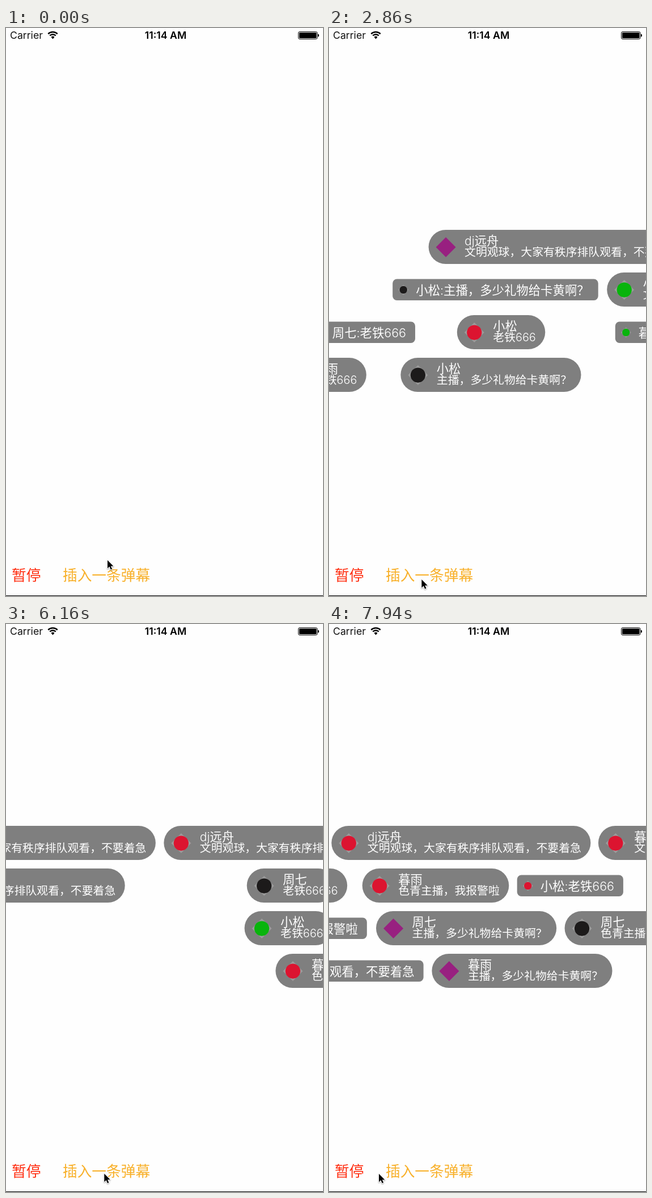
An HTML page with a canvas for the animation above (8000 ms loop, 559 px wide and 999 px high).

```html
<!DOCTYPE html>
<html lang="zh-CN">
<head>
<meta charset="utf-8">
<style>
  html, body { margin: 0; width: 100%; height: 100%; overflow: hidden; background: #fefefe; }
  canvas { display: block; }
</style>
</head>
<body>
<canvas id="stage" width="559" height="999"></canvas>
<script>
const ctx = document.getElementById('stage').getContext('2d');
const LOOP = 8000, W = 559, H = 999;
const RED = '#ff2d10', ORANGE = '#f8b12c';
const PAUSE_AT = 4290, RESUME_AT = 5240;

const LONG = '文明观球，大家有秩序排队观看，不要着急';
const GIFT = '主播，多少礼物给卡黄啊？';
const REPORT = '色青主播，我报警啦';
const SIX = '老铁666';

const COLORS = { red: '#dc1430', green: '#08b40c', black: '#1c1a1a', pink: '#f2486e', purple: '#982080' };

// Each lane moves at its own multiple of the base speed: [start x, shape, icon, name, message]
const lanes = [
  [[293, 'big', 'purple', 'dj远舟', LONG],
   [764.5, 'big', 'red', 'dj远舟', LONG],
   [1235, 'big', 'red', '暮雨', LONG]],
  [[347, 'small', 'black', '小松', GIFT],
   [725, 'big', 'green', '小松', LONG],
   [1397, 'big', 'black', '周七', SIX],
   [1579, 'big', 'red', '暮雨', REPORT],
   [1852, 'small', 'red', '小松', SIX]],
  [[317, 'small', 'red', '周七', SIX],
   [578, 'big', 'red', '小松', SIX],
   [857, 'small', 'green', '暮雨', REPORT],
   [1172, 'big', 'red', 'dj远舟', SIX],
   [1879, 'big', 'green', '小松', SIX],
   [2049, 'small', 'pink', '周七', REPORT],
   [2363.5, 'big', 'purple', '周七', GIFT],
   [2696, 'big', 'black', '周七', REPORT]],
  [[380, 'big', 'red', '暮雨', SIX],
   [596, 'big', 'black', '小松', GIFT],
   [1052, 'small', 'green', '小松', REPORT],
   [1370.5, 'big', 'black', '小松', SIX],
   [2420, 'big', 'red', '暮雨', REPORT],
   [2695, 'small', 'green', '周七', LONG],
   [3222, 'big', 'purple', '暮雨', GIFT]]
];

// [time, base distance travelled]
const travel = [[0, -336], [2120, 0], [3540, 225], [PAUSE_AT, 342], [RESUME_AT, 342],
  [6160, 486], [7130, 634.3], [7940, 760], [LOOP, 769.3]];

// [time, x, y]
const pointer = [[0, 179, 936], [210, 179, 936], [900, 163, 974], [1100, 163, 976], [1800, 163, 970],
  [2700, 163, 970], [3540, 165, 970], [4150, 57, 972], [4330, 55, 969], [4719, 55, 969], [4720, 55, 968],
  [5260, 55, 968], [6000, 173, 967], [7130, 175, 966], [7640, 175, 967], [7940, 88, 967], [LOOP, 88, 967]];

function track(keys, t) {
  let i = 1;
  while (i < keys.length - 1 && keys[i][0] < t) i++;
  const a = keys[i - 1], b = keys[i], k = (t - a[0]) / (b[0] - a[0]);
  return a.slice(1).map((v, j) => v + (b[j + 1] - v) * k);
}

const font = (size, weight = 350) => `${weight} ${size}px Inter, "Noto Sans CJK SC", "Noto Sans CJK", sans-serif`;

function text(str, x, y, size, color, weight) {
  ctx.font = font(size, weight);
  ctx.fillStyle = color;
  ctx.fillText(str, x, y);
}

function widthOf(str, size) {
  ctx.font = font(size);
  return ctx.measureText(str).width;
}

function box(x, y, w, h, r, color) {
  ctx.fillStyle = color;
  ctx.beginPath();
  ctx.roundRect(x, y, w, h, r);
  ctx.fill();
}

function icon(kind, x, y, r) {
  if (kind !== 'pink') {
    ctx.fillStyle = kind === 'purple' ? COLORS.purple : '#9b9b9b';
    ctx.beginPath();
    ctx.moveTo(x - r, y);
    ctx.lineTo(x, y - r);
    ctx.lineTo(x + r, y);
    ctx.lineTo(x, y + r);
    ctx.fill();
  }
  if (kind === 'purple') return;
  ctx.fillStyle = COLORS[kind];
  ctx.beginPath();
  ctx.arc(x, y, r * 0.75, 0, 7);
  ctx.fill();
}

function bullet(x, y, shape, kind, name, message) {
  if (x > W || x < -600) return;
  if (shape === 'big') {
    const w = 80 + Math.max(widthOf(name, 21.2), widthOf(message, 19.85));
    box(x, y, w, 60, 30, '#7f7f7f');
    icon(kind, x + 30.5, y + 30.5, 17.5);
    text(name, x + 63.5, y + 27, 21.2, '#fff');
    text(message, x + 63.5, y + 45.5, 19.85, '#fff');
  } else {
    const line = name + ':' + message;
    box(x, y + 11.5, 57 + widthOf(line, 21.4), 37.5, 7.5, '#7f7f7f');
    icon(kind, x + 19, y + 30.5, 9);
    text(line, x + 41, y + 38.5, 21.4, '#fff');
  }
}

function statusBar() {
  text('Carrier', 7, 19.3, 17.7, '#111', 400);
  ctx.textAlign = 'center';
  text('11:14 AM', 281.5, 19.3, 17.7, '#000', 600);
  ctx.textAlign = 'left';

  // Wi-Fi
  ctx.strokeStyle = ctx.fillStyle = '#000';
  ctx.lineWidth = 2.4;
  for (const r of [7.4, 11.6]) {
    ctx.beginPath();
    ctx.arc(82.5, 18.6, r, -Math.PI * 0.75, -Math.PI * 0.25);
    ctx.stroke();
  }
  ctx.beginPath();
  ctx.moveTo(82.5, 19.4);
  ctx.arc(82.5, 18.8, 4.2, -Math.PI * 0.75, -Math.PI * 0.25);
  ctx.fill();

  // Battery
  ctx.lineWidth = 1;
  ctx.beginPath();
  ctx.roundRect(515.5, 6.5, 33.5, 13, 2.5);
  ctx.stroke();
  box(517, 8, 30.5, 10, 1.2, '#000');
  box(550, 10.5, 2, 5, [0, 2, 2, 0], '#000');
}

const arrow = new Path2D('M0 0V14.4L3.4 11.3L5.7 16.6L8.1 15.6L5.8 10.4H10.4Z');

function cursor(x, y) {
  ctx.save();
  ctx.translate(x, y);
  ctx.lineJoin = 'round';
  ctx.lineWidth = 2.2;
  ctx.strokeStyle = '#fff';
  ctx.shadowColor = 'rgba(0,0,0,.35)';
  ctx.shadowBlur = 2;
  ctx.shadowOffsetY = 1;
  ctx.stroke(arrow);
  ctx.shadowColor = 'transparent';
  ctx.fillStyle = '#000';
  ctx.fill(arrow);
  ctx.restore();
}

function draw(t) {
  ctx.fillStyle = '#fefefe';
  ctx.fillRect(0, 0, W, H);
  statusBar();

  const [distance] = track(travel, t);
  lanes.forEach((items, i) => {
    for (const [x, ...rest] of items) bullet(x - distance * (i + 1), 355 + 75 * i, ...rest);
  });

  const paused = t >= PAUSE_AT && t < RESUME_AT;
  text(paused ? '继续' : '暂停', 10, 971.5, 25.7, paused ? ORANGE : RED);
  text('插入一条弹幕', 100, 971.5, 25.7, ORANGE);

  ctx.fillStyle = '#000';
  ctx.fillRect(0, 998, W, 1);
  cursor(...track(pointer, t));
}

const start = performance.now();
function tick() {
  draw((performance.now() - start) % LOOP);
  requestAnimationFrame(tick);
}
tick();
</script>
</body>
</html>
```
